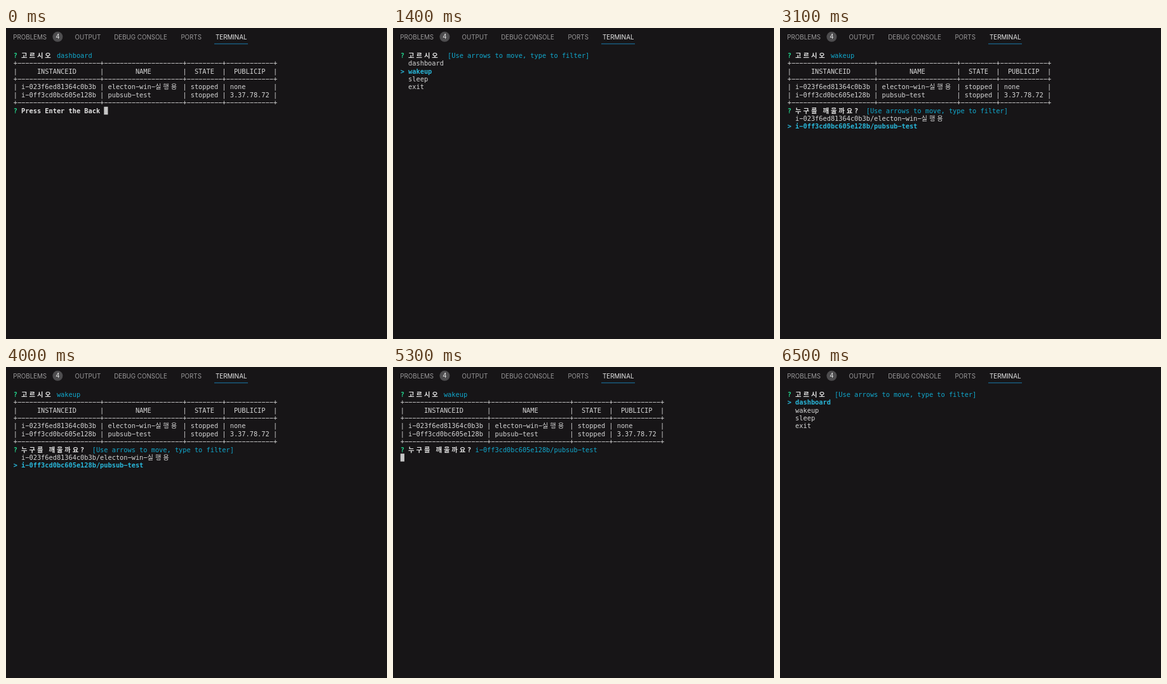
These frames come from a looping animation (600x489 px, 7 s). An HTML page:

```html
<!DOCTYPE html>
<html lang="ko">
<head>
<meta charset="utf-8">
<title>Terminal prompt</title>
<style>
  html, body { margin: 0; width: 100%; height: 100%; overflow: hidden; background: #171517; }
  svg { display: block; width: 600px; height: 489px; }
  .tab { font: 9.75px Inter, Roboto, sans-serif; fill: #9a999a; }
  .active { fill: #e7e7e7; }
  .term text {
    font: 10.3px "DejaVu Sans Mono", "Noto Sans CJK KR", "Noto Sans CJK", monospace;
    white-space: pre;
    fill: #d6d6d6;
  }
  .term .bold { font-weight: bold; fill: #e2e2e2; }
  .term .ask { font-weight: bold; fill: #23d18b; }
  .term .cyan { fill: #11a8cd; }
  .term .pick { font-weight: bold; fill: #29b8db; }
  .cursor { fill: #c6c6c6; }
</style>
</head>
<body>
<svg id="stage" viewBox="0 0 600 489">
  <rect width="600" height="489" fill="#171517"/>
  <g class="tab">
    <text x="11.3" y="17.5">PROBLEMS</text>
    <text x="108.5" y="17.5">OUTPUT</text>
    <text x="170.3" y="17.5">DEBUG CONSOLE</text>
    <text x="275.4" y="17.5">PORTS</text>
    <text x="330" y="17.5" class="active">TERMINAL</text>
    <circle cx="81.4" cy="13.8" r="8" fill="#4e4d4f"/>
    <text x="81.4" y="17.3" class="active" text-anchor="middle">4</text>
  </g>
  <rect x="328" y="24.4" width="53" height="1" fill="#1a7cae"/>
</svg>
<script>
const NS = 'http://www.w3.org/2000/svg';
const LOOP = 7000;
const LEFT = 11.7, TOP = 37, CELL = 6.2, LINE = 12.4, BASE = 9.8;
const stage = document.getElementById('stage');

function add(parent, tag, attrs, text) {
  const el = document.createElementNS(NS, tag);
  for (const key in attrs) el.setAttribute(key, attrs[key]);
  if (text) el.textContent = text;
  parent.appendChild(el);
  return el;
}

const cells = ch => /[\uac00-\ud7a3]/.test(ch) ? 2 : 1;

// A line is a list of [text, style]; every character sits on the terminal grid.
function drawLine(group, row, runs) {
  let col = 0;
  for (const [text, style] of runs) {
    if (style === 'cursor') {
      add(group, 'rect', {
        class: style, x: LEFT + col * CELL, y: TOP + row * LINE, width: CELL, height: LINE
      });
      continue;
    }
    const xs = [...text].map(ch => {
      const x = LEFT + col * CELL;
      col += cells(ch);
      return x.toFixed(2);
    });
    add(group, 'text', {
      class: style || '', x: xs.join(' '), y: (TOP + BASE + row * LINE).toFixed(2)
    }, text.replace(/-/g, '\u2212'));
  }
}

function makeScene(lines) {
  const group = add(stage, 'g', { class: 'term', visibility: 'hidden' });
  lines.forEach((runs, row) => drawLine(group, row, runs));
  return group;
}

const ids = ['i-023f6ed81364c0b3b', 'i-0ff3cd0bc605e128b'];
const names = ['electon-win-실행용', 'pubsub-test'];
const targets = ids.map((id, i) => id + '/' + names[i]);
const commands = ['dashboard', 'wakeup', 'sleep', 'exit'];
const HINT = '[Use arrows to move, type to filter]';

const rule = '+' + [21, 20, 9, 12].map(n => '-'.repeat(n)).join('+') + '+';
const table = [
  rule,
  '|     INSTANCEID      |        NAME        |  STATE  |  PUBLICIP  |',
  rule,
  `| ${ids[0]} | ${names[0]} | stopped | none       |`,
  `| ${ids[1]} | ${names[1]}        | stopped | 3.37.78.72 |`,
  rule
].map(text => [[text]]);

const ask = (label, ...rest) => [['? ', 'ask'], [label, 'bold'], ...rest];
const choose = (label, answer) => ask(label, [' ' + answer, 'cyan']);
const prompt = label => ask(label, ['  ' + HINT, 'cyan']);
const options = (list, picked) => list.map((text, i) =>
  i === picked ? [['> ' + text, 'pick']] : [['  ' + text]]);

const MAIN = '고르시오', WHO = '누구를 깨울까요?';
const cursor = ['', 'cursor'];
const back = ask('Press Enter the Back ', cursor);
const menu = picked => [prompt(MAIN), ...options(commands, picked)];
const wake = [choose(MAIN, 'wakeup'), ...table];
const pickTarget = picked => [...wake, prompt(WHO), ...options(targets, picked)];
const chosen = [...wake, choose(WHO, targets[1])];

const steps = [
  [0, [choose(MAIN, 'dashboard'), ...table, back]],
  [100, menu(0)],
  [1000, menu(1)],
  [2000, [choose(MAIN, 'wakeup'), [cursor]]],
  [2100, pickTarget(0)],
  [3000, pickTarget(1)],
  [4200, [...chosen, [cursor]]],
  [6000, [...chosen, back]],
  [6400, menu(0)]
].map(([at, lines]) => ({ at, group: makeScene(lines) }));

let shown = null;
function frame() {
  const t = performance.now() % LOOP;
  const step = steps.filter(s => s.at <= t).pop();
  if (step !== shown) {
    if (shown) shown.group.setAttribute('visibility', 'hidden');
    step.group.setAttribute('visibility', 'visible');
    shown = step;
  }
  requestAnimationFrame(frame);
}
frame();
</script>
</body>
</html>
```
